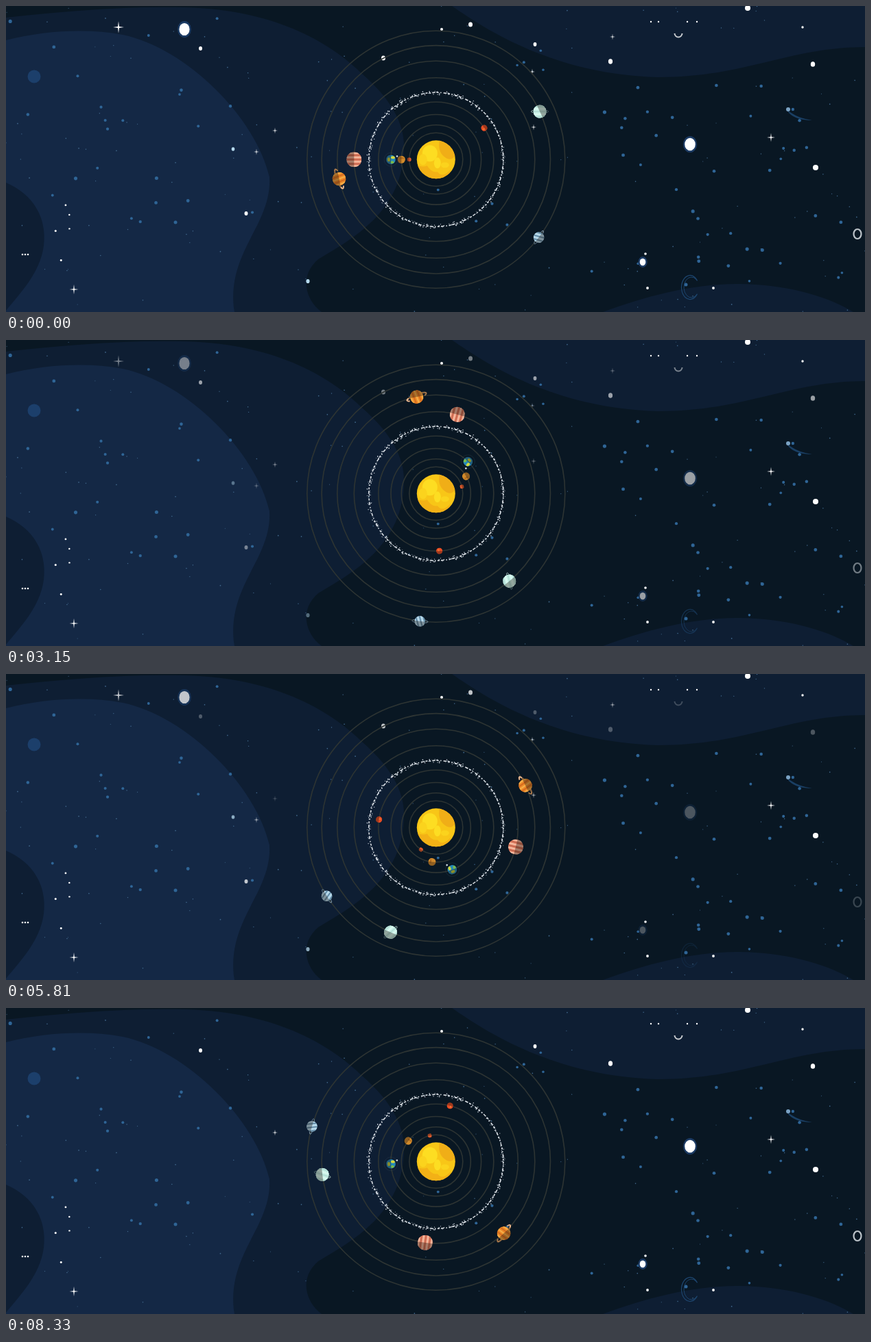
Write an HTML page with a canvas that moves like this. It is 1252x447 px and loops after 8400 ms.

```html
<!DOCTYPE html>
<html lang="en">
<head>
<meta charset="utf-8">
<title>Solar system</title>
<style>
html, body { margin: 0; width: 100%; height: 100%; overflow: hidden; background: #091723; }
canvas { display: block; width: 1252px; height: 447px; }
</style>
</head>
<body>
<canvas id="stage" width="1252" height="447"></canvas>
<script>
const W = 1252, H = 447, CX = 626.8, CY = 224.3;
const LOOP = 8400, STEP = 70, PI = Math.PI, TAU = PI * 2, RAD = PI / 180;
const screen = document.getElementById('stage').getContext('2d');
let g = screen;

let seed = 11;
const rnd = (from = 0, to = 1) => {
  seed = (seed * 16807) % 2147483647;
  return from + (to - from) * seed / 2147483647;
};

function oval(x, y, rx, ry, color = '#fff') {
  g.fillStyle = color;
  g.beginPath();
  g.ellipse(x, y, rx, ry, 0, 0, TAU);
  g.fill();
}
const dot = (x, y, r, color) => oval(x, y, r, r, color);
const star = (x, y, r, color) => oval(x, y, r, r * 1.2, color);

function arc(x, y, rx, ry, color, width, from = 0, to = TAU) {
  g.strokeStyle = color;
  g.lineWidth = width;
  g.beginPath();
  g.ellipse(x, y, rx, ry, 0, from, to);
  g.stroke();
}

function shape(d, color) {
  g.fillStyle = color;
  g.fill(new Path2D(d));
}

function sparkle(x, y, r = 4) {
  g.fillStyle = '#fff';
  g.beginPath();
  for (let i = 0; i < 8; i++) {
    const a = i * TAU / 8, d = i % 2 ? r * 0.17 : r;
    g.lineTo(x + d * Math.cos(a), y + d * Math.sin(a) * 1.1);
  }
  g.fill();
}

function glow(x, y, r) {
  star(x, y, r + 2.3, '#1b3a63');
  star(x, y, r);
}

// Scatters count dots over a box
function scatter(count, x0, y0, x1, y1, r0, r1, color) {
  for (let i = 0; i < count; i++) dot(rnd(x0, x1), rnd(y0, y1), rnd(r0, r1), color);
}

// Renders a still layer once
function layer(paint) {
  const c = document.createElement('canvas');
  c.width = W;
  c.height = H;
  g = c.getContext('2d');
  paint();
  g = screen;
  return c;
}

const sky = layer(() => {
  const mid = '#0e1e33', blue = '#2f6596';
  g.fillStyle = '#091723';
  g.fillRect(0, 0, W, H);
  shape('M0 17C80 8 170 0 260 2C400 5 480 60 520 100C560 135 580 170 580 205C580 300 505 340 455 370C428 393 435 428 460 447H0Z', mid);
  shape('M0 50C60 35 120 33 170 42C265 62 365 165 384 250C388 320 320 360 333 447H0Z', '#142845');
  shape('M0 258C40 275 60 310 55 350C50 390 20 420 0 445Z', mid);
  shape('M650 0C700 35 800 100 950 104C1080 104 1140 60 1252 60V0Z', mid);
  shape('M870 447C930 425 1000 405 1070 406C1130 407 1190 420 1235 447Z', mid);
  dot(41, 103, 9.5, '#1c3f6b');

  scatter(150, 0, 0, W, H, 0.5, 0.9, '#41688c');
  scatter(24, 0, 0, 370, 335, 1.8, 2.6, blue);
  scatter(8, 620, 30, 800, 390, 1.6, 2.2, blue);
  scatter(38, 840, 100, 1225, 410, 1.8, 2.6, blue);

  dot(1081, 3, 4);
  dot(635, 34, 2);
  dot(1180, 236, 4);
  for (const x of [24, 28, 32]) dot(x, 363, 1.3);
  for (const x of [940, 951, 993, 1007]) dot(x, 23, 1.2);
  for (const x of [935, 1031]) dot(x, 412, 1.9);
  scatter(5, 65, 275, 105, 395, 1.2, 1.6);
  dot(932, 362, 1.8);
  dot(1161, 31, 1.7);
  sparkle(1115, 192, 6);
  sparkle(99, 414, 6.5);
  shape('M1138 152Q1147 167 1175 167Q1156 164 1146 157Z', '#1a3f64');
  dot(1140, 151, 3, '#7ba3c4');
  dot(991, 407, 2.5, blue);
});

const twinkleA = layer(() => {
  sparkle(164, 31, 8);
  glow(260, 34, 7.6);
  sparkle(365, 213);
  sparkle(767, 96);
  sparkle(769, 177);
  sparkle(884, 45);
  star(331, 209, 2.3, '#b5d9ee');
  star(440, 402, 2.6, '#b5d9ee');
  star(350, 303, 2.5);
  star(677, 27, 3);
  star(550, 76, 3);
});

const twinkleB = layer(() => {
  sparkle(392, 182);
  glow(997, 202, 7.8);
  glow(928, 374, 4.3);
  star(283.5, 62, 2.5);
  star(771, 56, 2.4);
  star(881, 81, 3.1);
  star(1176, 85, 3.2);
  arc(980, 40, 5.5, 5.5, '#c6cace', 2, 0, PI);
  arc(1241, 333, 5.5, 7, '#bcc3c9', 2.2);
  arc(997, 411, 12.5, 17.5, '#1d456e', 1.2, 0.6, TAU - 0.6);
  arc(999, 411, 11, 15, '#1d456e', 1, 0.7, TAU - 0.7);
});

// Ball in local axes: x points away from the sun, and that side lies in shade
function ball(r, color, detail) {
  g.save();
  g.beginPath();
  g.arc(0, 0, r, 0, TAU);
  g.clip();
  g.fillStyle = color;
  g.fillRect(-r, -r, 2 * r, 2 * r);
  if (detail) detail(r);
  g.fillStyle = 'rgba(30,22,15,.36)';
  g.fillRect(0, -r, r, 2 * r);
  g.restore();
}

// Evenly spaced stripes in two alternating colours
const bands = (tilt, count, ...colors) => r => {
  const gap = 2 * r / count;
  g.rotate(tilt * RAD);
  for (let i = 0; i < count; i++) {
    g.fillStyle = colors[i % 2];
    g.fillRect(-r, -r + (i + 0.25) * gap, 2 * r, gap / 2);
  }
  g.rotate(-tilt * RAD);
};

function hoop(tilt, rx, color, width, from, to) {
  g.save();
  g.rotate(tilt * RAD);
  arc(0, 0, rx, rx * 0.23, color, width, from, to);
  g.restore();
}

function earth() {
  arc(0, 0, 10, 10, 'rgba(70,90,100,.3)', 0.7);
  ball(6.8, '#2489bb', () => {
    oval(-3, 3, 3, 2, '#d4d63a');
    oval(-2, -4, 2.5, 2, '#79b94a');
    oval(3, 0, 2, 3, '#c9d238');
  });
  dot(-9, 4.8, 1.3, '#d9e2e8');
}

function saturn() {
  hoop(80, 15, '#8c6743', 2, PI, TAU);
  ball(9.8, '#ee8b29', bands(-10, 5, '#f8b04a', '#d56c1f'));
  hoop(80, 15, '#f2bd93', 2, PI * 0.78, PI * 1.2);
  hoop(80, 15, '#a8794c', 1.8, -0.5, 0.7);
}

function uranus() {
  hoop(25, 12.5, '#4f6669', 0.9);
  ball(9.6, '#c8f1e7', bands(25, 5, '#b3ded6', '#dcfaf2'));
  hoop(25, 12.5, '#8fa9a8', 0.8, 2.5, 3.8);
}

function neptune() {
  hoop(-93, 11.5, '#64798a', 0.9);
  ball(7.8, '#9fc8e0', bands(-22, 6, '#547a93', '#c4dfec'));
  hoop(-93, 11.5, '#7e95a5', 0.8, -0.6, 0.6);
}

// Orbit radius, starting angle, painter; from the sun outwards
const planets = [
  [39, 180, () => ball(3, '#dc5a2c')],
  [50.5, 180, () => ball(5.6, '#d18a2b', () => oval(-1, 2, 3, 1.2, '#b46d20'))],
  [65.8, 180, earth],
  [84, -33.3, () => ball(4.6, '#e84d24', () => oval(-1, 1, 2, 1, '#f47735'))],
  [119.5, 180, () => ball(11, '#e88f73', bands(0, 7, '#f6c4ab', '#c16048'))],
  [144, 168.7, saturn],
  [166.7, -24.9, uranus],
  [188, 37.2, neptune]
];

const system = layer(() => {
  g.translate(CX, CY);
  for (const [r] of planets) arc(0, 0, r, r, '#2d3433', 1.6);
  g.setLineDash([3, 2.5, 1.5, 3, 4.5, 2]);
  arc(0, 0, 98, 98, '#e6eaee', 1.5);
  g.setLineDash([]);
  for (let i = 0; i < 430; i++) {
    const a = rnd(0, TAU), r = 98 + rnd(-2, 2) + rnd(-2, 2);
    dot(r * Math.cos(a), r * Math.sin(a), rnd(0.35, 0.85), '#d5dce4');
  }
  dot(0, 0, 28, '#f8c617');
  g.beginPath();
  g.arc(0, 0, 28, 0, TAU);
  g.clip();
  shape('M5 -28Q2 -12 12 -4Q22 4 28 -6V-28Z', '#f0ae17');
  shape('M-28 8Q-20 12 -13 9Q-6 20 2 18Q10 28 22 14L16 30H-28Z', '#f3b116');
  oval(-9, -9, 11, 12, '#fddd22');
  oval(-19, 0, 6, 8, '#fbd31d');
  oval(2, 5, 5, 8, '#fddd22');
  oval(13, 8, 6, 4, '#fbd31d');
});

// Opacities of the two star groups: opposed waves, with a hard cut at the loop seam
function blink(n) {
  if (n === 0) return [1, 1];
  if (n === LOOP / STEP - 1) return [0, 1];
  const a = 0.91 - 0.16 * Math.abs((n + 3) % 10 - 5);
  return [a, 1.02 - a];
}

function paint(still, alpha = 1) {
  g.globalAlpha = alpha;
  g.drawImage(still, 0, 0);
  g.globalAlpha = 1;
}

function draw(now) {
  const n = Math.floor((now % LOOP) / STEP), t = n * STEP / LOOP;
  const [a, b] = blink(n);
  paint(sky);
  paint(twinkleA, a);
  paint(twinkleB, b);
  paint(system);
  planets.forEach(([r, start, body], i) => {
    const sweep = 440 - 40 * i; // degrees per loop
    g.save();
    g.translate(CX, CY);
    g.rotate((start + sweep * t) * RAD);
    g.translate(r, 0);
    body();
    g.restore();
  });
}

let begin;
function tick(now) {
  begin ??= now;
  draw(now - begin);
  requestAnimationFrame(tick);
}
draw(0);
requestAnimationFrame(tick);
</script>
</body>
</html>
```
